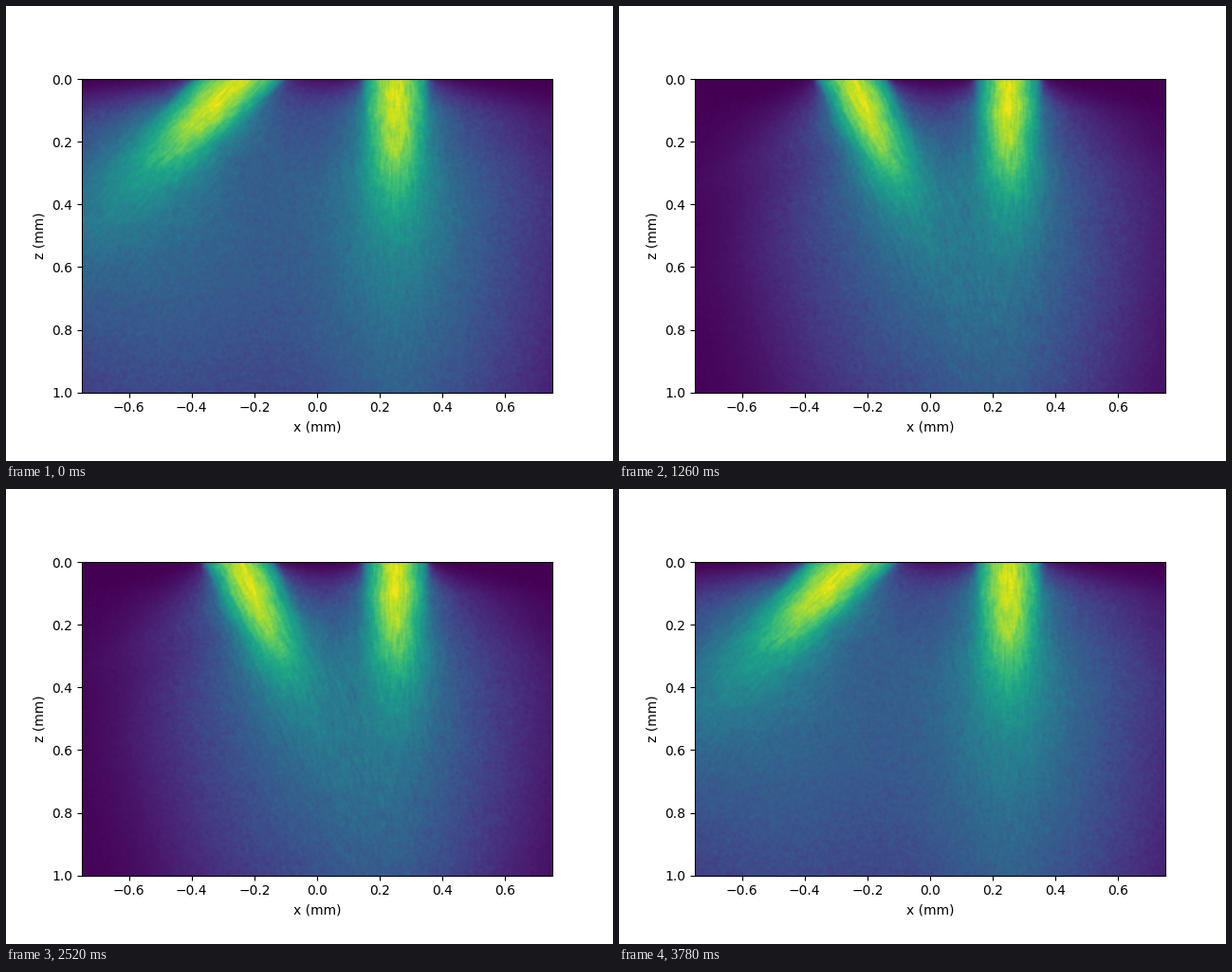
Animation of 640x480 px, one loop 3870 ms. Source, as a matplotlib script:

```python
import numpy as np
import matplotlib.pyplot as plt
from matplotlib.animation import FuncAnimation

STEPS = 21            # tilt steps in one sweep
FRAMES = 2 * STEPS + 1
DECADE = 0.33         # share of the colour scale per factor of ten
HALF = 0.1            # beam half width in mm
NX, NZ = 300, 200

x, z = np.meshgrid(
    (np.arange(NX) + 0.5) / NX * 1.5 - 0.75,
    (np.arange(NZ) + 0.5) / NZ,
)

# On-axis level, depth of the side falloff and its width along the beam
AXIS_S = [0, 0.1, 0.2, 0.3, 0.4, 0.5, 0.6, 0.7, 0.8, 1.0, 1.4]
AXIS_V = [0.92, 0.94, 0.87, 0.72, 0.56, 0.45, 0.36, 0.30, 0.25, 0.18, 0.05]
SIDE_S = [0, 0.2, 0.4, 0.6, 0.8, 1.0]
SIDE_M = [0.90, 0.87, 0.50, 0.34, 0.22, 0.15]
SIDE_Q = [0.11, 0.11, 0.16, 0.24, 0.28, 0.32]


def sigmoid(v):
    return 1 / (1 + np.exp(-np.clip(v, -40, 40)))


def beam(x0, tilt):
    """Log levels of the direct beam and of its diffuse glow."""
    sin, cos = np.sin(tilt), np.cos(tilt)
    s = (x - x0) * sin + z * cos
    r = np.abs((x - x0) * cos - z * sin)

    u2 = (r / np.interp(s, SIDE_S, SIDE_Q)) ** 2
    side = np.interp(s, SIDE_S, SIDE_M) * u2 / (1 + u2) + 0.25 * r
    edge = 0.4 * sigmoid((r - HALF - 0.003) / 0.006) * np.exp(-z / 0.08)
    core = np.interp(s, AXIS_S, AXIS_V) - side - edge

    dx, dz = x - x0 - 0.3 * sin, z - 0.45
    glow = 0.22 - 0.22 * ((dx / 0.45) ** 2 + (dz / 0.8) ** 2)
    return core, glow - 0.35 * np.exp(-z / 0.1)


def streaks(noise, tilt):
    """Noise smeared along the beam direction."""
    shifts = [(round(k * np.cos(tilt)), round(k * np.sin(tilt)))
              for k in range(-4, 5)]
    return sum(np.roll(noise, d, (0, 1)) for d in shifts) / 3


def grain(noise):
    """Noise softened to specks about two cells wide."""
    soft = noise + np.roll(noise, 1, 0)
    return (soft + np.roll(soft, 1, 1)) / 2


def fluence(step):
    degrees = -45 + 5 * step
    tilts = np.radians(degrees), 0.0
    layers = [beam(-0.25, tilts[0]), beam(0.25, tilts[1])]
    total = sum(10 ** (v / DECADE) for pair in layers for v in pair)
    level = DECADE * np.log10(total)

    # Colour range widens as the beams come to overlap
    contrast = 0.9 + 0.09 * np.exp(degrees / 52)
    level = 1 - (1 - level) * contrast
    level = 0.06 * np.logaddexp(0, level / 0.06)

    rng = np.random.default_rng(100 + step)
    noise = rng.standard_normal((NZ, NX))
    level += 0.013 * grain(noise) * np.clip(level / 0.2, 0.2, 1)
    for (core, _), tilt in zip(layers, tilts):
        level += 0.022 * streaks(noise, tilt) * np.clip(core, 0, 1)
    return np.clip(level, 0, 0.98)


fields = [fluence(step) for step in range(STEPS + 1)]

fig, ax = plt.subplots(figsize=(6.4, 4.8), dpi=100)
image = ax.imshow(fields[0], extent=(-0.75, 0.75, 1, 0), cmap="viridis",
                  vmin=0, vmax=1, interpolation="bilinear")
ax.set_xlabel("x (mm)")
ax.set_ylabel("z (mm)")


def draw(frame):
    image.set_data(fields[STEPS - abs(STEPS - frame)])
    return [image]


anim = FuncAnimation(fig, draw, frames=FRAMES, interval=90, repeat=True,
                     repeat_delay=0, blit=False)
plt.show()
```
